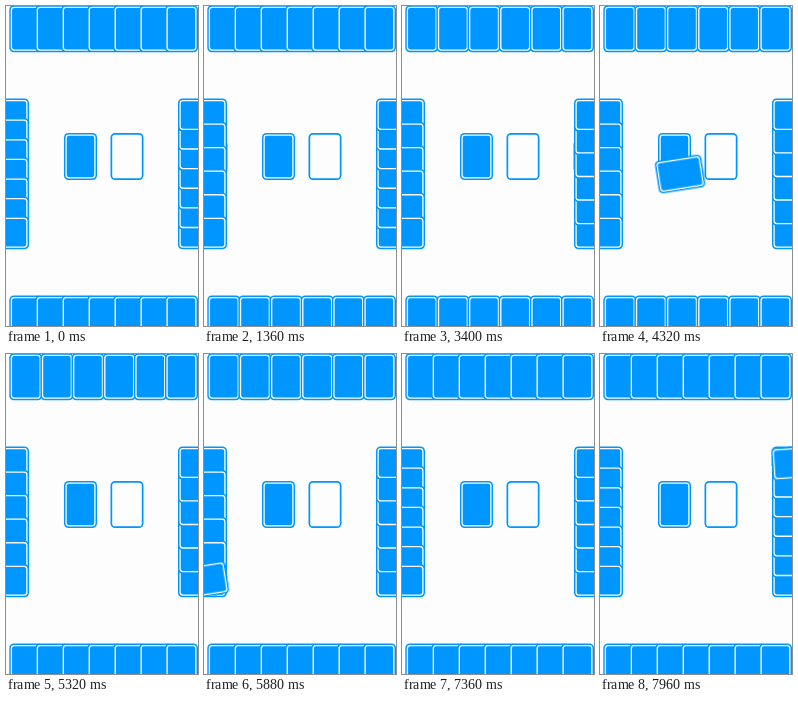
An HTML page that plays this animation: 192 by 320 pixels, repeating every 8000 ms.

```html
<!DOCTYPE html>
<html lang="en">
<head>
<meta charset="utf-8">
<title>Card table</title>
<style>
  html, body { margin: 0; width: 100%; height: 100%; overflow: hidden; background: #fdfdfe; }
  svg { display: block; width: 192px; height: 320px; }
  .edge { fill: #0096ff; }
  .ring { fill: none; stroke: #fdfdfe; stroke-width: 1.3; }
  .face { fill: #fdfdfe; stroke: #0096ff; stroke-width: 1.7; }

  /* Every part shares an 8 s loop; --at is the moment its own cycle begins. */
  .full, .short, .play, .draw {
    animation-duration: 8s;
    animation-iteration-count: infinite;
    animation-delay: calc(var(--at) * 1ms - 8000ms);
  }
  .full { animation-name: full; animation-timing-function: step-end; }
  .short { animation-name: short; animation-timing-function: step-end; }
  .play { animation-name: play-show, play-move, play-turn; animation-timing-function: step-end, linear, linear; }
  .draw { animation-name: draw-show, draw-move, draw-turn; animation-timing-function: step-end, linear, linear; }

  @keyframes full { 0% { opacity: 0; } 56.6%, 100% { opacity: 1; } }
  @keyframes short { 0% { opacity: 1; } 56.6%, 100% { opacity: 0; } }

  @keyframes play-show { 0% { opacity: 1; } 5%, 100% { opacity: 0; } }
  @keyframes play-move {
    0% { translate: var(--from); animation-timing-function: cubic-bezier(.5, 0, .3, 1); }
    5%, 100% { translate: var(--to); }
  }
  @keyframes play-turn {
    0% { rotate: 90deg; animation-timing-function: cubic-bezier(.5, 0, .3, 1); }
    5%, 100% { rotate: 0deg; }
  }

  @keyframes draw-show { 0% { opacity: 0; } .5% { opacity: 1; } 8.1%, 100% { opacity: 0; } }
  @keyframes draw-move {
    0% { translate: var(--from); animation-timing-function: cubic-bezier(.2, .03, .18, 1); }
    8%, 100% { translate: var(--to); }
  }
  @keyframes draw-turn {
    0% { rotate: var(--turn0); }
    8%, 100% { rotate: var(--turn1); }
  }
</style>
</head>
<body>
<svg id="table" width="192" height="320">
  <defs>
    <g id="back">
      <rect class="edge" x="-16.5" y="-23.5" width="33" height="47" rx="4.5"/>
      <rect class="ring" x="-14.4" y="-21.4" width="28.8" height="42.8" rx="2.8"/>
    </g>
    <rect id="front" class="face" x="-15.65" y="-22.65" width="31.3" height="45.3" rx="3.7"/>
  </defs>
</svg>
<script>
  const table = document.getElementById('table');
  const DECK = [74.5, 150.5], PILE = [121, 150.5];

  // first/last: centres of the end cards; playFrom/drawTo: flight ends in the hand
  const hands = [
    { first: [19.8, 313], last: [175.5, 313], turn: 0,
      playAt: 360, playFrom: [124, 313], drawAt: 4258, drawTo: [126, 313] },
    { first: [-.5, 109], last: [-.5, 226.7], turn: 90,
      playAt: 1360, playFrom: [-.5, 150.5], drawAt: 5305, drawTo: [-.5, 226.7] },
    { first: [19.8, 22.7], last: [175.5, 22.7], turn: 0,
      playAt: 2360, playFrom: [150, 22.7], drawAt: 6300, drawTo: [30.6, 22.7] },
    { first: [195.5, 226.7], last: [195.5, 109], turn: 90,
      playAt: 3400, playFrom: [195.5, 150.5], drawAt: 7348, drawTo: [195.5, 109] }
  ];

  function add(parent, tag, attrs) {
    const el = document.createElementNS('http://www.w3.org/2000/svg', tag);
    for (const key in attrs) el.setAttribute(key, attrs[key]);
    return parent.appendChild(el);
  }

  function place(parent, shape, [x, y], turn = 0) {
    add(parent, 'use', { href: '#' + shape, transform: `translate(${x} ${y}) rotate(${turn})` });
  }

  const px = ([x, y]) => `${x}px ${y}px`;

  function fly(kind, shape, at, from, to, extra = '') {
    const style = `--at:${at};--from:${px(from)};--to:${px(to)};${extra}`;
    add(add(table, 'g', { class: kind, style }), 'use', { href: '#' + shape });
  }

  function row(hand, kind, count) {
    const group = add(table, 'g', { class: kind, style: `--at:${hand.playAt}` });
    for (let i = 0; i < count; i++) {
      const k = i / (count - 1);
      place(group, 'back', hand.first.map((v, n) => v + (hand.last[n] - v) * k), hand.turn);
    }
  }

  place(table, 'front', PILE);
  place(table, 'back', DECK);
  for (const h of hands) fly('play', 'front', h.playAt, h.playFrom, PILE);
  for (const h of hands) {
    row(h, 'full', 7);
    row(h, 'short', 6);
  }
  for (const h of hands) {
    fly('draw', 'back', h.drawAt, DECK, h.drawTo, `--turn0:${90 - h.turn}deg;--turn1:${h.turn}deg`);
  }
</script>
</body>
</html>
```
